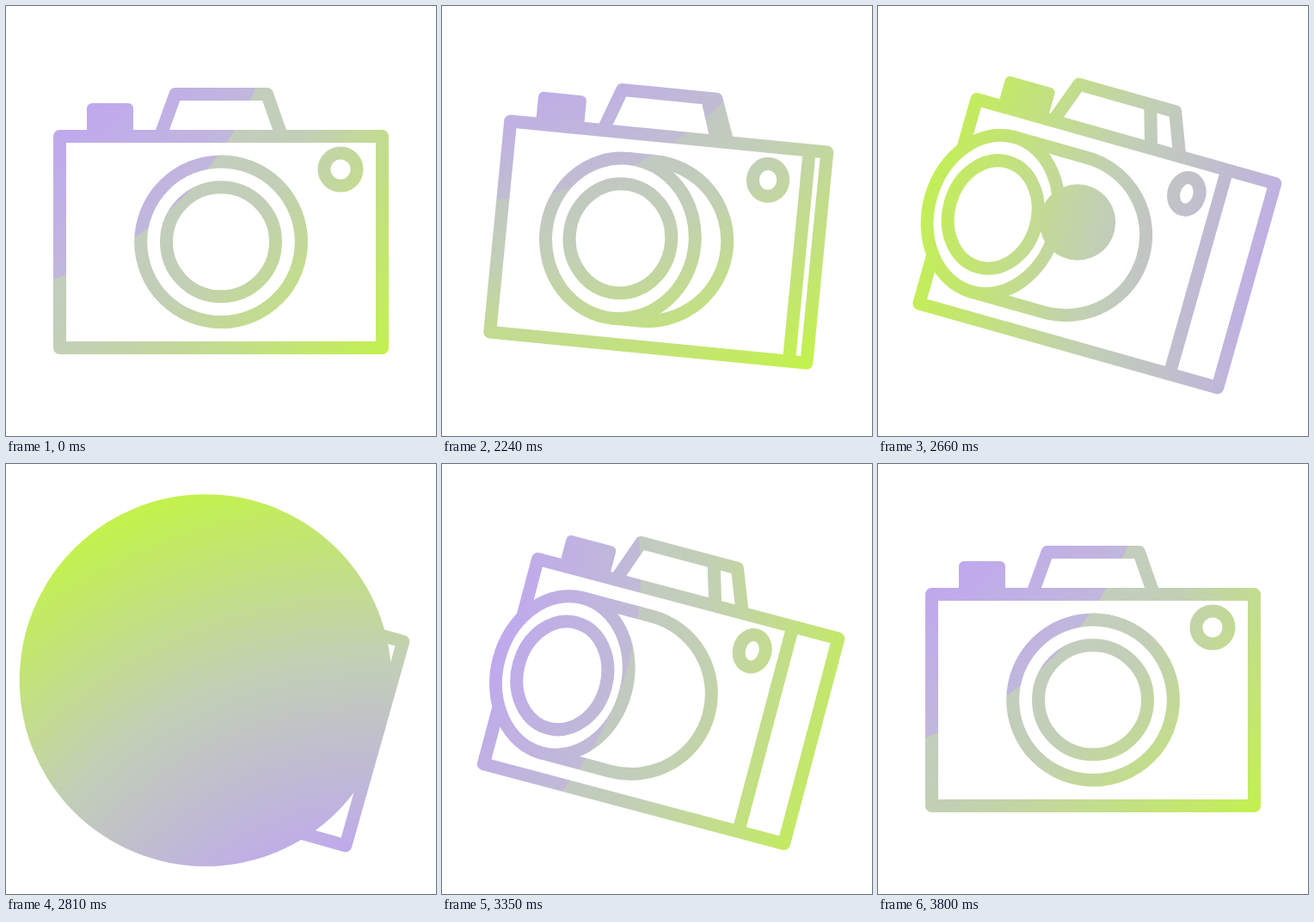
Animation, 500 px wide and 500 px high, one loop 3830 ms. Source, as an HTML page without scripts:

```html
<!DOCTYPE html>
<html lang="en">
<head>
<meta charset="utf-8">
<title>Camera</title>
<style>
html, body { margin: 0; width: 100%; height: 100%; overflow: hidden; background: #fff; }
svg { display: block; width: 100%; height: 100%; }

.move { animation: 3.83s cubic-bezier(.333, 0, .667, 1) infinite; }
.ink { stroke: #fff; stroke-width: 15; stroke-linejoin: round; stroke-linecap: round; }

#camera { transform-origin: 250px 250px; animation-name: tilt; }
#frame { animation-name: frame; }
#button { animation-name: button; }
#finder { animation-name: finder; }
#barrel { animation-name: barrel; }
#rim { animation-name: rim; }
#glass { animation-name: glass; }
#flash { animation-name: flash; }
#spin { transform-origin: 250px 250px; animation-name: spin; }
#shade { animation-name: shift; }
#low { animation-name: low; }
#high { animation-name: high; }

/* rest until 2000 ms, turned 2600 to 3275 ms, back at 3800 ms */
@keyframes tilt {
  0%, 52.219%, 99.217%, to { transform: rotate(0deg); }
  67.885%, 85.509% { transform: rotate(15.75deg); }
}
@keyframes frame {
  0%, 52.219%, 99.217%, to {
    d: path("M62.5 151.5L437.5 151.5L437.5 397.5L62.5 397.5ZM437.5 151.5L437.5 397.5M179.5 151L197 102.5L303.5 102.5L320.5 151M303.5 102.5L320.5 151");
  }
  67.885%, 85.509% {
    d: path("M81.5 150.5L442 150.5L442 397.2L81.5 397.2ZM384 150.5L384 397.2M174 150L191.3 101.5L307.5 101.5L326.5 150M277.5 101.5L292 150");
  }
}
@keyframes button {
  0%, 52.219%, 99.217%, to { x: 94px; y: 113px; width: 54px; }
  67.885%, 85.509% { x: 107px; y: 114px; width: 60px; }
}
@keyframes finder {
  0%, 52.219%, 99.217%, to { cx: 389px; rx: 19px; }
  67.885%, 85.509% { cx: 346.2px; rx: 15px; }
}
@keyframes barrel {
  0%, 52.219%, 99.217%, to { d: path("M250 181L250 181A93.3 93.3 0 0 1 250 367.6L250 367.6"); }
  67.885%, 85.509% { d: path("M136 181L224 181A93.3 93.3 0 0 1 224 367.6L136 367.6"); }
}
@keyframes rim {
  0%, 52.219%, 99.217%, to { cx: 250px; rx: 93.3px; }
  67.885%, 85.509% { cx: 136px; rx: 75px; }
}
@keyframes glass {
  0%, 52.219%, 99.217%, to { cx: 250px; rx: 63.5px; }
  67.885%, 85.509% { cx: 136px; rx: 51.5px; }
}
@keyframes flash {
  0%, 67.885%, 78.851%, to { r: 0px; }
  73.368% { r: 216.3px; }
}

/* colour sweep */
@keyframes spin {
  0%, 52.219% { transform: rotate(43.2deg); animation-timing-function: cubic-bezier(.33, 0, .43, 1); }
  99.217%, to { transform: rotate(403.2deg); }
}
@keyframes shift {
  0%, 52.219%, 92.95%, to { transform: translateX(0); }
  63.969%, 73.368% { transform: translateX(-35px); }
  79.634% { transform: translateX(39px); }
}
@keyframes low {
  0%, 53%, 92%, to { stop-color: #c1b7dc; }
  63.969%, 80% { stop-color: #c1c2c8; }
}
@keyframes high {
  0%, 53%, 92%, to { stop-color: #c3cdbd; }
  63.969%, 80% { stop-color: #c1c2c8; }
}
</style>
</head>
<body>
<svg viewBox="0 0 500 500">
  <defs>
    <radialGradient id="tint" gradientUnits="userSpaceOnUse" cx="-203" cy="250" r="700">
      <stop offset=".357" stop-color="#bfa9ed"/>
      <stop id="low" class="move" offset=".574" stop-color="#c1b7dc"/>
      <stop id="high" class="move" offset=".574" stop-color="#c3cdbd"/>
      <stop offset=".683" stop-color="#c2cfb6"/>
      <stop offset="1" stop-color="#c3f14e"/>
    </radialGradient>
    <mask id="shape" maskUnits="userSpaceOnUse" x="0" y="0" width="500" height="500">
      <g id="camera" class="move">
        <path id="frame" class="move ink" fill="none" d="M62.5 151.5L437.5 151.5L437.5 397.5L62.5 397.5ZM437.5 151.5L437.5 397.5M179.5 151L197 102.5L303.5 102.5L320.5 151M303.5 102.5L320.5 151"/>
        <rect id="button" class="move" x="94" y="113" width="54" height="42" rx="6" fill="#fff"/>
        <ellipse id="finder" class="move ink" cx="389" cy="190" rx="19" ry="19"/>
        <path id="barrel" class="move ink" d="M250 181L250 181A93.3 93.3 0 0 1 250 367.6L250 367.6"/>
        <ellipse id="rim" class="move ink" cx="250" cy="274.3" rx="93.3" ry="93.3"/>
        <ellipse id="glass" class="move ink" cx="250" cy="274.3" rx="63.5" ry="63.5"/>
      </g>
      <circle id="flash" class="move" cx="232" cy="251.5" r="0" fill="#fff"/>
    </mask>
  </defs>
  <g mask="url(#shape)">
    <g id="spin" class="move">
      <rect id="shade" class="move" x="-900" y="-900" width="2300" height="2300" fill="url(#tint)"/>
    </g>
  </g>
</svg>
</body>
</html>
```
